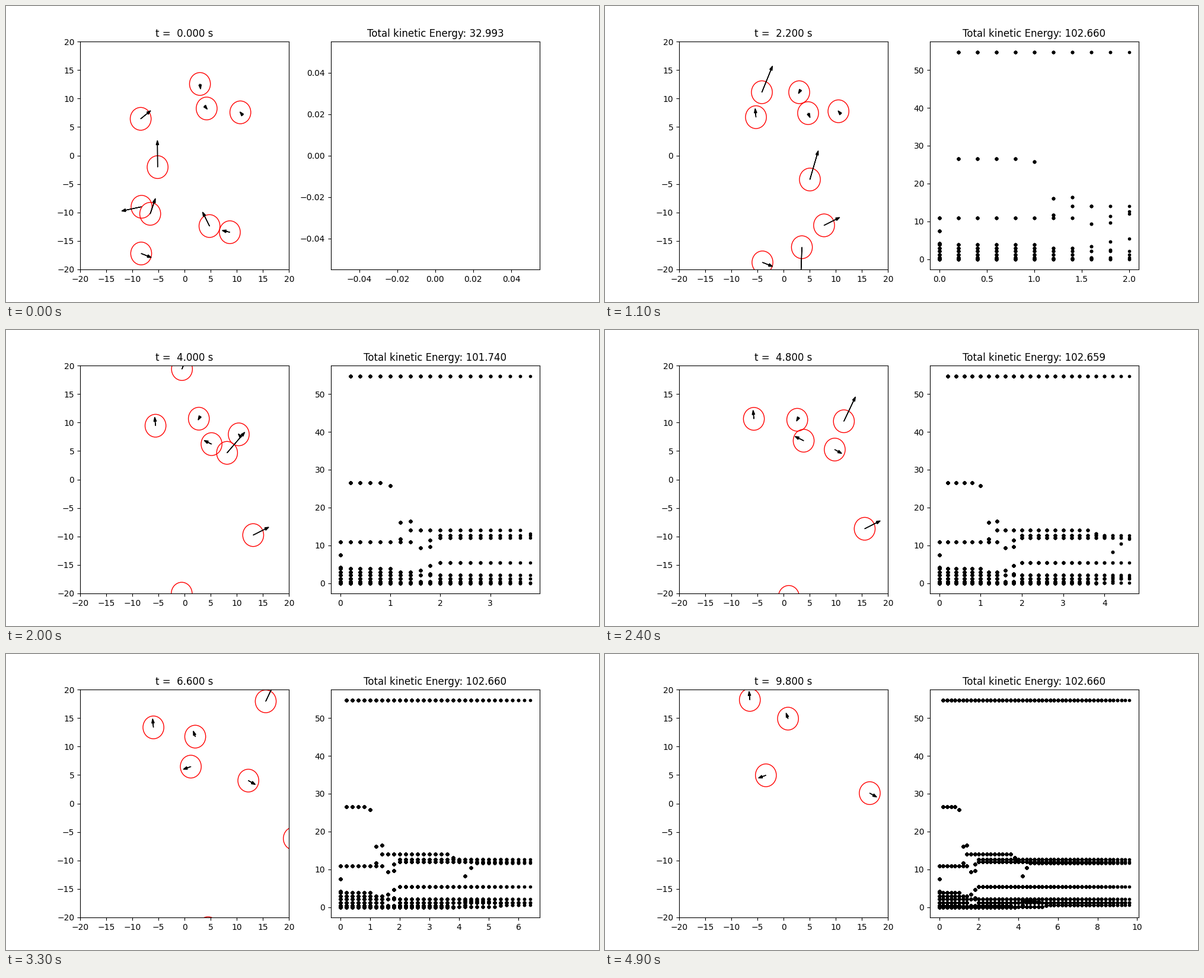
Recreate the animation shown at these times as a matplotlib script. Size 1000x500 px, loop 5000 ms.

```python
import numpy as np
import matplotlib.pyplot as plt
from matplotlib.animation import FuncAnimation

FRAMES, DT = 50, 0.2
SUBSTEPS = 100
RADIUS = 2
STIFFNESS = 20    # repulsion = STIFFNESS * overlap**3
KNOWN = 15        # step at which the state below holds

# x, y, vx, vy of each disc; the motion before and after follows from the forces
STATE = np.array([
    (2.88, 10.91, -0.145, -0.24),
    (5.0, 6.8, 0.38, -0.79),
    (10.45, 7.83, -0.077, 0.087),
    (-2.53, 14.78, 2.03, 4.6),
    (-5.41, 7.93, -0.154, 1.507),
    (-37.97, 0.38, -9.98, 3.1672),
    (3.35, -20.02, -0.2, -4.9),
    (6.32, -0.18, 1.6, 5.05),
    (10.15, -11.15, 2.99, 1.39),
    (-2.49, -19.33, 1.94, -0.71),
])


def accel(pos):
    gap = pos[:, None] - pos[None]
    dist = np.hypot(gap[..., 0], gap[..., 1])
    np.fill_diagonal(dist, np.inf)
    overlap = np.clip(2 * RADIUS - dist, 0, None)
    return ((STIFFNESS * overlap**3 / dist)[..., None] * gap).sum(axis=1)


def simulate(steps, dt):
    """Velocity Verlet from the known state; a negative dt runs time backwards."""
    pos, vel = STATE[:, :2].copy(), STATE[:, 2:].copy()
    h = dt / SUBSTEPS
    acc = accel(pos)
    states = [(pos.copy(), vel.copy())]
    for _ in range(steps):
        for _ in range(SUBSTEPS):
            vel += acc * h / 2
            pos += vel * h
            acc = accel(pos)
            vel += acc * h / 2
        states.append((pos.copy(), vel.copy()))
    return states


STATES = simulate(KNOWN, -DT)[:0:-1] + simulate(FRAMES - 1 - KNOWN, DT)
KINETIC = np.array([(vel**2).sum(axis=1) / 2 for _, vel in STATES])

fig, (ax, ax_energy) = plt.subplots(1, 2, figsize=(10, 5), dpi=100)


def draw(i):
    ax.cla()
    for pos, vel in zip(*STATES[i]):
        ax.add_patch(plt.Circle(pos, RADIUS, color="r", fill=False))
        ax.arrow(*pos, *vel, head_width=0.5, length_includes_head=True, color="k")
    ax.set(xlim=(-20, 20), ylim=(-20, 20), title=f"t = {i * DT:6.3f} s")

    # the whole history is plotted again at each step, so old dots get bolder
    ax_energy.cla()
    steps = np.array([j for n in range(1, i + 1) for j in range(n)], dtype=int)
    ax_energy.plot(np.repeat(steps * DT, len(STATE)), KINETIC[steps].ravel(), "k.")
    ax_energy.set_title(f"Total kinetic Energy: {KINETIC[i].sum():.3f}")
    return []


anim = FuncAnimation(fig, draw, frames=FRAMES, init_func=lambda: [],
                     interval=100, repeat=True, repeat_delay=0)
plt.show()
```
